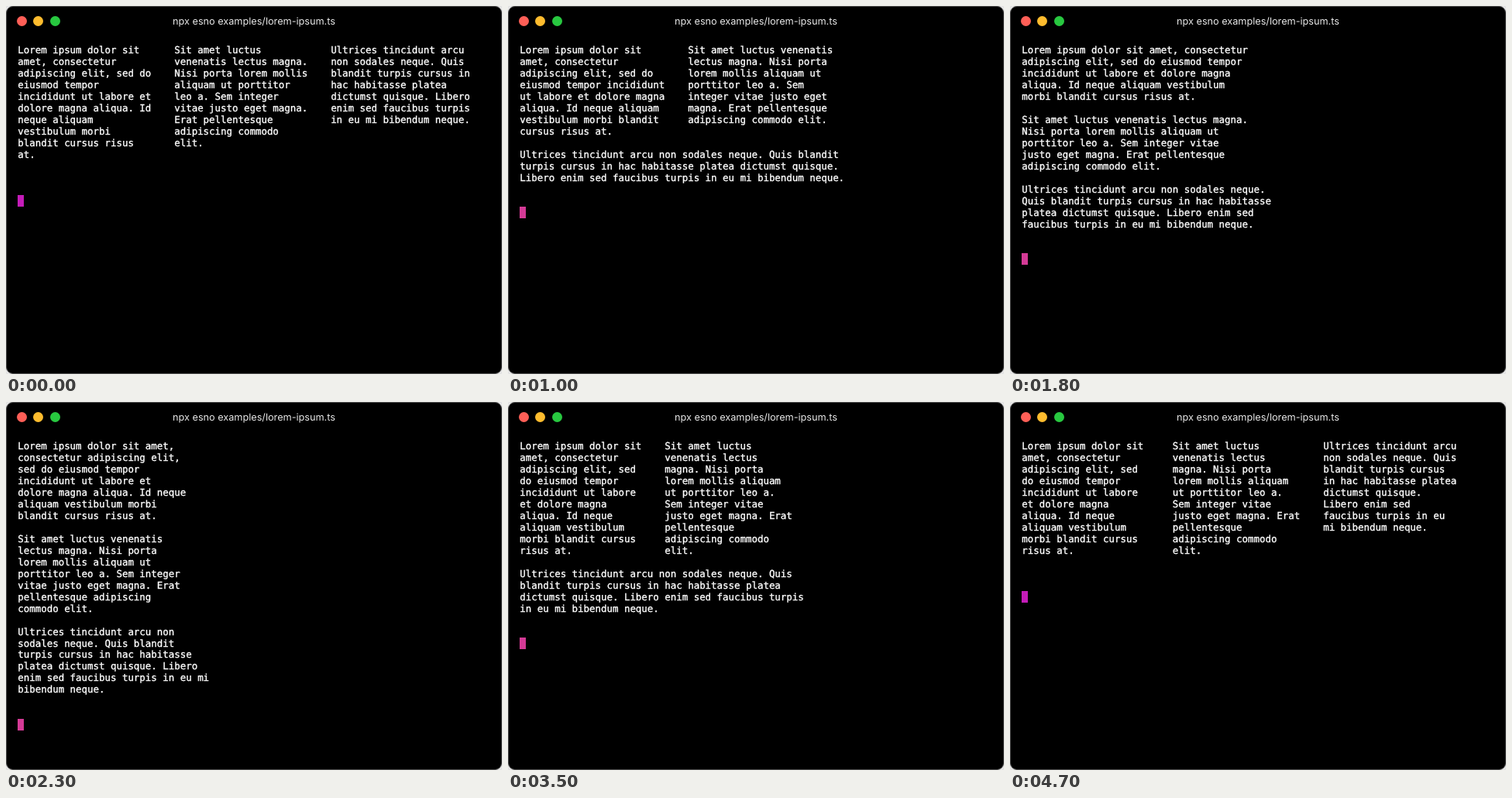
An HTML page for the animation above (4800 ms loop, 640x475 px).

```html
<!DOCTYPE html>
<html lang="en">
<head>
<meta charset="utf-8">
<title>Lorem ipsum in a terminal</title>
<style>
  html, body { margin: 0; width: 100%; height: 100%; overflow: hidden; background: #e4e4e4; }
  #window {
    position: absolute; inset: 0; box-sizing: border-box; overflow: hidden;
    background: #000; border: 1px solid #4c4c4c; border-radius: 9px;
  }
  #stage { position: absolute; left: -1px; top: -1px; width: 640px; height: 475px; text-rendering: geometricPrecision; }
  .dot { position: absolute; top: 13.2px; width: 13px; height: 13px; border-radius: 50%; }
  #title {
    position: absolute; top: 10.5px; width: 100%; text-align: center; color: #e8e8e8;
    font: 12.68px/19px Inter, "Open Sans", sans-serif;
  }
  #text {
    position: absolute; left: 15.3px; top: 50.3px; margin: 0; color: #fff;
    font: 12.43px/14.95px "DejaVu Sans Mono", monospace;
    -webkit-text-stroke: 0.35px #fff;
  }
  #cursor { position: absolute; left: 15px; width: 8px; height: 15px; }
</style>
</head>
<body>
<div id="window"><div id="stage">
  <div class="dot" style="left:13.5px;background:#ff5f57"></div>
  <div class="dot" style="left:35px;background:#febc2e"></div>
  <div class="dot" style="left:56.5px;background:#28c840"></div>
  <div id="title">npx esno examples/lorem-ipsum.ts</div>
  <pre id="text"></pre>
  <div id="cursor"></div>
</div></div>
<script>
const LOOP = 4800, STEP = 100, TOP = 50, LINE = 14.95, GAP = 4;
const text = document.getElementById("text");
const cursor = document.getElementById("cursor");

const a = "Lorem ipsum dolor sit amet, consectetur adipiscing elit, sed do eiusmod tempor incididunt ut labore et dolore magna aliqua. Id neque aliquam vestibulum morbi blandit cursus risus at.";
const b = "Sit amet luctus venenatis lectus magna. Nisi porta lorem mollis aliquam ut porttitor leo a. Sem integer vitae justo eget magna. Erat pellentesque adipiscing commodo elit.";
const c = "Ultrices tincidunt arcu non sodales neque. Quis blandit turpis cursus in hac habitasse platea dictumst quisque. Libero enim sed faucibus turpis in eu mi bibendum neque.";

function wrap(paragraph, width) {
  const lines = [];
  let line = "";
  for (const word of paragraph.split(" ")) {
    if (line && line.length + 1 + word.length > width) {
      lines.push(line);
      line = word;
    } else {
      line += (line && " ") + word;
    }
  }
  return [...lines, line];
}

// Every paragraph but the last keeps a gap to its right and a blank row below.
function flexRow(items, width) {
  const gaps = items.filter(p => p !== c).length;
  const step = (width - GAP * gaps) / items.length + GAP;
  const edge = i => Math.min(width, Math.floor(i * step));
  const columns = items.map((p, i) => wrap(p, edge(i + 1) - edge(i) - (p === c ? 0 : GAP)));
  const height = Math.max(...columns.map((lines, i) => lines.length + (items[i] === c ? 0 : 1)));
  return Array.from({ length: height }, (_, y) =>
    columns.reduce((row, lines, i) => row.padEnd(edge(i)) + (lines[y] || ""), ""));
}

function layout(width) {
  const rows = width >= 68 ? [[a, b, c]] : width >= 44 ? [[a, b], [c]] : [[a], [b], [c]];
  return rows.flatMap(items => flexRow(items, width));
}

let shown = -1;
function draw() {
  const k = Math.floor(performance.now() % LOOP / STEP);
  if (k !== shown) {
    shown = k;
    const width = Math.min(78, 30 + Math.abs(2 * k - 49));
    const rows = layout(width);
    text.textContent = rows.join("\n");
    cursor.style.top = TOP + (rows.length + 2) * LINE + "px";
    cursor.style.background = width >= 68 ? "#c41cb8" : "#d43a96";
  }
  requestAnimationFrame(draw);
}
draw();
</script>
</body>
</html>
```
